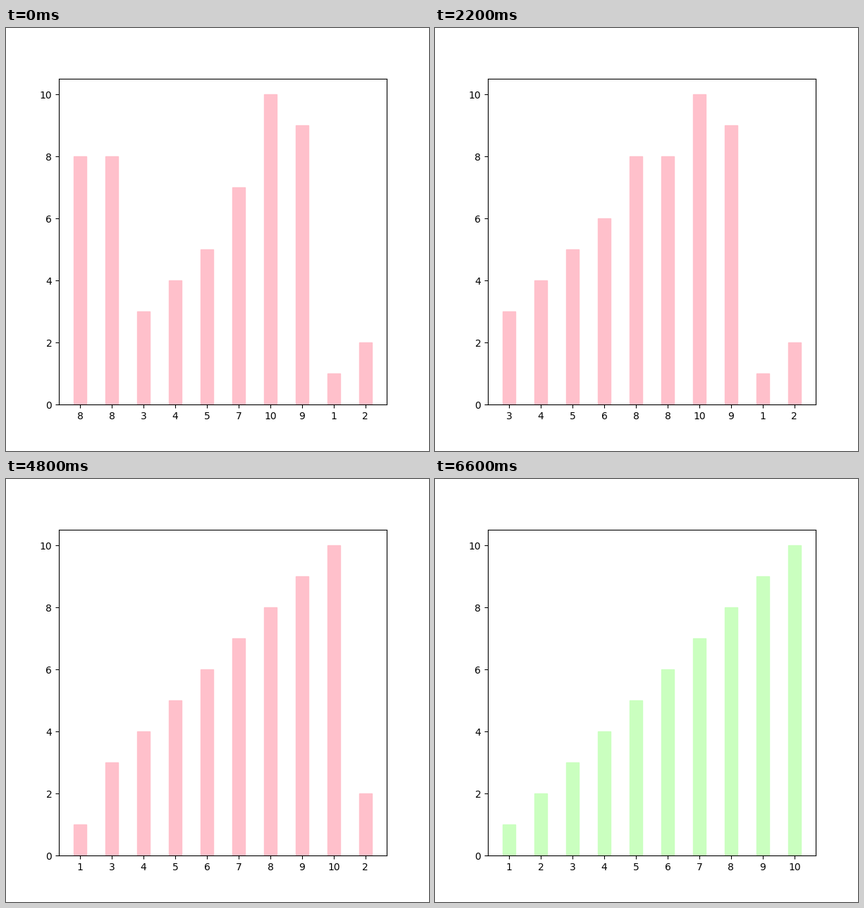
Write a matplotlib script that moves like this. It is 600 by 600 pixels and loops after 7.8 s.

```python
import matplotlib.pyplot as plt
from matplotlib.animation import FuncAnimation

VALUES = [8, 6, 3, 4, 5, 7, 10, 9, 1, 2]
STEP_MS = 200
HOLD_STEPS = 5  # extra steps on the sorted result
BUSY, DONE = "pink", "#caffbf"


def insertion_sort_steps(values):
    """Yield the list after every shift and every insertion."""
    items = list(values)
    for i in range(1, len(items)):
        key, j = items[i], i
        while j > 0 and items[j - 1] > key:
            items[j] = items[j - 1]
            j -= 1
            yield list(items)
        items[j] = key
        yield list(items)


steps = list(insertion_sort_steps(VALUES))
last = len(steps) - 1

plt.rcParams["font.family"] = "DejaVu Sans"
fig, ax = plt.subplots(figsize=(6, 6), dpi=100)
positions = range(len(VALUES))
bars = ax.bar(positions, VALUES, width=0.4, color=BUSY)
ax.set_ylim(0, 10.5)


def draw(frame):
    heights = steps[min(frame, last)]
    color = DONE if frame >= last else BUSY
    for bar, height in zip(bars, heights):
        bar.set_height(height)
        bar.set_color(color)
    ax.set_xticks(positions, [str(h) for h in heights])
    return list(bars)


anim = FuncAnimation(fig, draw, frames=len(steps) + HOLD_STEPS,
                     init_func=lambda: draw(0), interval=STEP_MS,
                     repeat=True, repeat_delay=0, blit=False)
plt.show()
```
